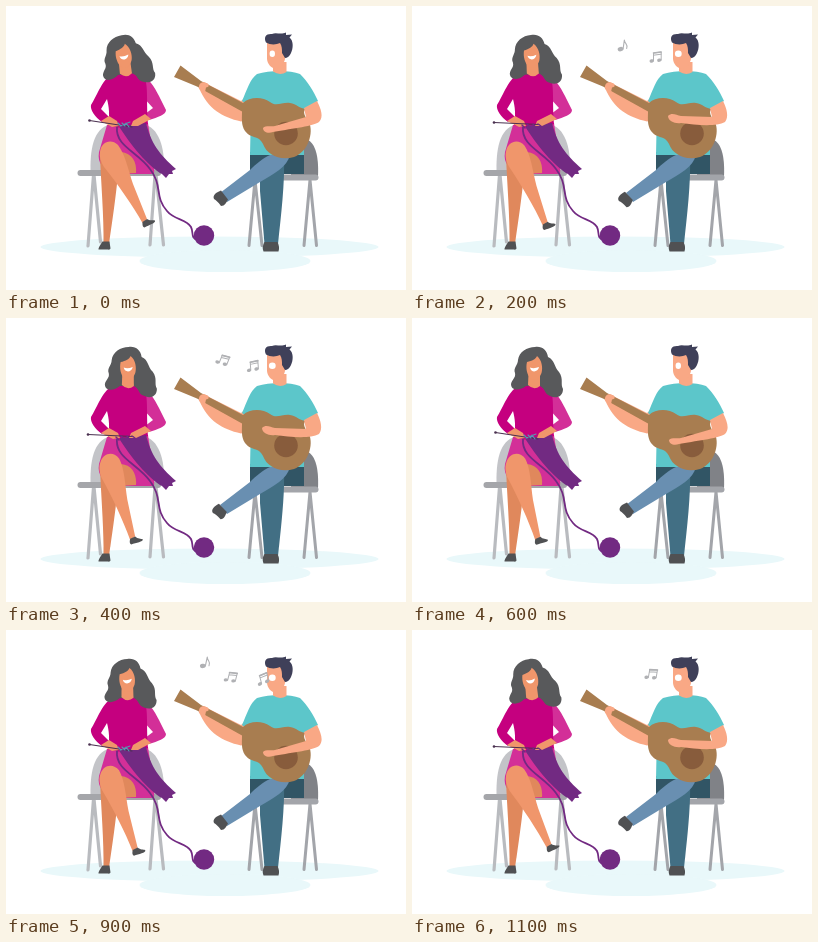
Animation of 400 by 284 pixels, one loop 1.2 s. Source, as an HTML page:

```html
<!DOCTYPE html>
<html lang="en">
<head>
<meta charset="utf-8">
<title>Knitting and guitar</title>
<style>
  html, body { margin: 0; width: 100%; height: 100%; overflow: hidden; background: #fff; }
  svg { display: block; width: 100vw; height: 100vh; }
  .line { fill: none; stroke-linecap: round; stroke-linejoin: round; }
  .skin { fill: #f0966b; }
  .fair { fill: #f9a885; }
  .shoe { fill: #505153; }
  .top { fill: #c5007f; }
  .pink { fill: #d32f98; }
  .wool { fill: #722a82; }
  .wood { fill: #a87d50; }
</style>
</head>
<body>
<svg viewBox="0 0 400 284">
  <defs>
    <g id="single">
      <ellipse cx="-2.5" cy="3.5" rx="2.9" ry="2.2" transform="rotate(-20 -2.5 3.5)"/>
      <path class="line" stroke="#b0b1b4" stroke-width="1.1" d="M0 3V-6C1-2 5-2 3.5 2"/>
    </g>
    <g id="pair">
      <ellipse cx="-4.3" cy="4" rx="2.2" ry="1.7" transform="rotate(-15 -4.3 4)"/>
      <ellipse cx="3.3" cy="3.2" rx="2.2" ry="1.7" transform="rotate(-15 3.3 3.2)"/>
      <path class="line" stroke="#b0b1b4" d="M-2.5 4V-4L5.2-5V3M-2.5-1.8L5.2-2.8"/>
      <path class="line" stroke="#b0b1b4" stroke-width="1.6" d="M-2.5-4L5.2-5"/>
    </g>
  </defs>

  <g fill="#e9f8fa">
    <ellipse cx="203.5" cy="241" rx="169" ry="10.5"/>
    <ellipse cx="219" cy="255" rx="85.5" ry="11"/>
  </g>

  <!-- left chair -->
  <path fill="#c3c4c8" d="M84.500 165C84 139 89 120 107 118H137C153 121 159 142 158 165Z"/>
  <path class="line" stroke="#b9bbbf" stroke-width="3.2" d="M87.500 169L82 240M88 169L94.500 236M149 169L144 239M150 169L157.500 239"/>
  <path class="line" stroke="#a5a6aa" stroke-width="6" d="M74.500 167H152"/>

  <!-- knitter -->
  <path class="pink" d="M101 119L142 117C144 134 150 151 148 168H112C97 165 91 157 93 146Z"/>
  <path fill="#e0885c" d="M94 150C101 143 108 144 115 146C126 147 131 156 130 167L112 168C110 190 106 217 103 238H97.500C98 211 95 177 94 150Z"/>
  <path class="shoe" d="M96.500 235.500H103.500L104.500 242.500Q104 244 102 243.500H92.500Q92 242 96.500 235.500Z"/>
  <g id="shin">
    <path class="skin" d="M94 146C95 136 105 132 112 139C119 148 122 163 127 178L141 213L136.500 217C127 200 111 177 98 161C95 156 93 151 94 146Z"/>
    <path class="shoe" d="M136.500 216L141 213C144 215 147 214 149 214.500C150 217 143 219 138.500 221.500Q136 221 136.500 216Z"/>
  </g>
  <path class="pink" d="M136 69C143 73 148 80 153 90L160 104C160 109 152 111 143 114L139 108L147 102L137 91Z"/>
  <path class="top" d="M108 67C116 64 128 64 137 69C143 77 140 93 142 118C130 123 112 123 102 119C104 109 103 101 101 93L95 103L103 111L96 116C89 111 84 104 85 99C91 90 97 71 108 67Z"/>
  <path class="wool" d="M114 120L140 117C145 137 153 148 170 163L166 165L167 168L163 168L160 172L156 168C146 163 128 144 114 122Z"/>
  <path class="line" stroke="#722a82" stroke-width="1.8" d="M111 121C109 140 132 146 144 163C157 180 148 190 161 205C168 214 181 213 185 221C188 227 184 232 192 234"/>
  <circle class="wool" cx="198" cy="229.500" r="10.2"/>
  <g id="knit"></g>

  <g id="head">
    <path fill="#58595b" d="M123 29C130 28 135 32 136 39C143 42 142 49 147 54C152 61 148 66 151 71C151 79 144 81 138 78C132 76 134 71 128 68H114C108 73 99 73 99 66C100 61 104 60 103 55C101 50 106 47 106 42C107 34 115 29 123 29Z"/>
    <path class="skin" d="M116.500 56H128V68Q122 73 116 67Z"/>
    <path class="skin" d="M115 44C120 43 124 41 125 38C130 42 131 50 129.500 55C127 61 123 64 118.500 60.500C115 57 113.500 50 115 44Z"/>
    <path fill="#fff" d="M118 49.500Q122 51 127 49C126 54.500 119 55 118 49.500Z"/>
  </g>

  <!-- right chair -->
  <path fill="#808287" d="M285 133H299C309 135 313 149 312 171H285Z"/>
  <path class="line" stroke="#a3a5aa" stroke-width="3" d="M249 174L243 239.500M249 174L256 239.500M304 174L298 239.500M304 174L310.500 239.500"/>
  <path class="line" stroke="#a3a5aa" stroke-width="6" d="M249 171.500H309.500"/>

  <!-- guitarist -->
  <path fill="#315565" d="M244 146H298V168H264L244 164Z"/>
  <path fill="#426f84" d="M254 168C261 157 270 151 278 150C279 177 275 210 272 238H258.500L254 185Z"/>
  <path class="shoe" d="M258.500 236H271.500Q274 241 272.500 245.500H257.500Q255.500 241 258.500 236Z"/>
  <path fill="#698fb1" d="M264 149L284 149C281 161 268 168 254 176L221 196L214 187L244 164C250 158 257 152 264 149Z"/>
  <path id="tap" class="shoe" d="M215 184.500L222 193.500C220 197 219 200 215 200C212 196 210 194 208 193C206 189 211 186 215 184.500Z"/>
  <path class="fair" d="M193 82C194 76 199 75 203 79L235 95L241 90L249 101C245 109 241 115 235 115.500C216 111 202 103 193 82Z"/>
  <path fill="#5cc6ca" d="M251 68C264 64 284 64 294 68C302 76 307 84 312 95L298 103V149H244L245 102L236 95C241 84 244 73 251 68Z"/>
  <path class="wood" d="M168 71L174.500 59.500L195 75L237 97C243 91 256 90 264 96C270 101 276 96 284 97C291 98 292 102 300 103C296 105 299 111 303 116C308 127 302 146 288 151C274 155 261 149 257 138C253 129 245 133 239 125C235 119 236 112 236 105.500L191 80.500Z"/>
  <path class="fair" d="M193 83C192 77 197 74 202 78Q204 81 200 81.500L199 86Z"/>
  <circle fill="#885c3c" cx="280" cy="127.500" r="11.800"/>
  <path id="arm" class="fair"/>

  <path class="fair" d="M267 56H280.500V66Q274 70 267 65.500Z"/>
  <path class="fair" d="M261 36L276 35L279.500 50C279 56 276 61 271 62.500C265 63 261.500 58 261 53Z"/>
  <path fill="#3f4059" d="M260 36.500C257.500 31 260 27.500 266 28C270 26 275 29 280 26.500V29L286 28.500L283.500 31.500C288 35 287 43 285 47C284 50 281 52 279 52L276 47C276 43 276 40 274 37C270 39 264 39 260 36.500Z"/>
  <ellipse id="mouth" cx="266.300" cy="47.700" ry="3.300" fill="#fff"/>
  <g id="notes" fill="#b0b1b4"></g>
</svg>
<script>
const $ = id => document.getElementById(id);
const STEP = 100, STEPS = 12;

// Each note: shape, first step, then x, y, tilt for each step it is seen.
const notes = [
  { shape: 'single', from: 1, path: [[228, 46, 0], [211.5, 40, 8], [200, 33, 12]] },
  { shape: 'pair', from: 2, path: [[244, 51, 0], [225, 47, 14], [217, 42, 22]] },
  { shape: 'pair', from: 3, path: [[257, 49, -15], [247, 48, -4], [239.5, 44, 10]] }
];

const needles = (x1, y1, x2, y2) =>
  `<path class="line" stroke="#4a3150" stroke-width="1.2" d="M${x1} ${y1}L${x2} ${y2}"/>
   <circle cx="${x1}" cy="${y1}" r="1.3" fill="#4a3150"/>`;

const hands = (left, right) =>
  `<path class="skin" d="M95 115L103 110L${left} 115L${left + 2} 120L${left - 5} 121Z"/>
   <path class="skin" d="M139 108L145 113L${right + 7} 120L${right} 120L${right + 2} 115Z"/>`;

const wide = hands(111, 125) + needles(83.5, 114.5, 126, 121) +
  '<path class="line" stroke="#5798b4" stroke-width="1.1" d="M112 117L115 120M116 117L119 120M120 117L123 121M114 120L124 116"/>';
const close = hands(112, 123) + needles(82, 116.5, 127, 118.5) +
  '<path class="line" stroke="#722a82" stroke-width="1.5" d="M110 119L113 122M115 118L118 121M121 118L123 121M126 118L129 120"/>';

const armLow = 'M298 102L311 95C315 103 318 111 313 116C305 121 282 123 267 126C262 128 257 126 257 122C260 119 265 121 269 120L300 111Z';
const armHigh = 'M298 102L311 95C315 103 317 111 313 116C304 121 284 119 269 117C263 118 256 115 256 110C260 106 264 109 269 110L300 111Z';

let shown = -1;

function draw(k) {
  const swing = Math.cos(Math.PI * k / STEPS) ** 4;
  const down = k % 3 === 0;
  $('shin').setAttribute('transform', `rotate(${10.5 * (1 - swing)} 103 147)`);
  $('head').setAttribute('transform', `translate(${-2 * swing} 0) rotate(${-8 * swing} 122 68)`);
  $('knit').innerHTML = down ? wide : close;
  $('arm').setAttribute('d', down ? armLow : armHigh);
  $('tap').setAttribute('transform', down ? '' : 'translate(-1.5 1) rotate(-6 218 190)');
  $('mouth').setAttribute('rx', k % 6 ? 3.4 : 2.7);
  $('notes').innerHTML = notes.map(({ shape, from, path }) => {
    const at = path[k % 6 - from];
    return at ? `<use href="#${shape}" transform="translate(${at[0]} ${at[1]}) rotate(${at[2]})"/>` : '';
  }).join('');
}

function tick() {
  const k = Math.floor(performance.now() / STEP) % STEPS;
  if (k !== shown) draw(shown = k);
  requestAnimationFrame(tick);
}
tick();
</script>
</body>
</html>
```
